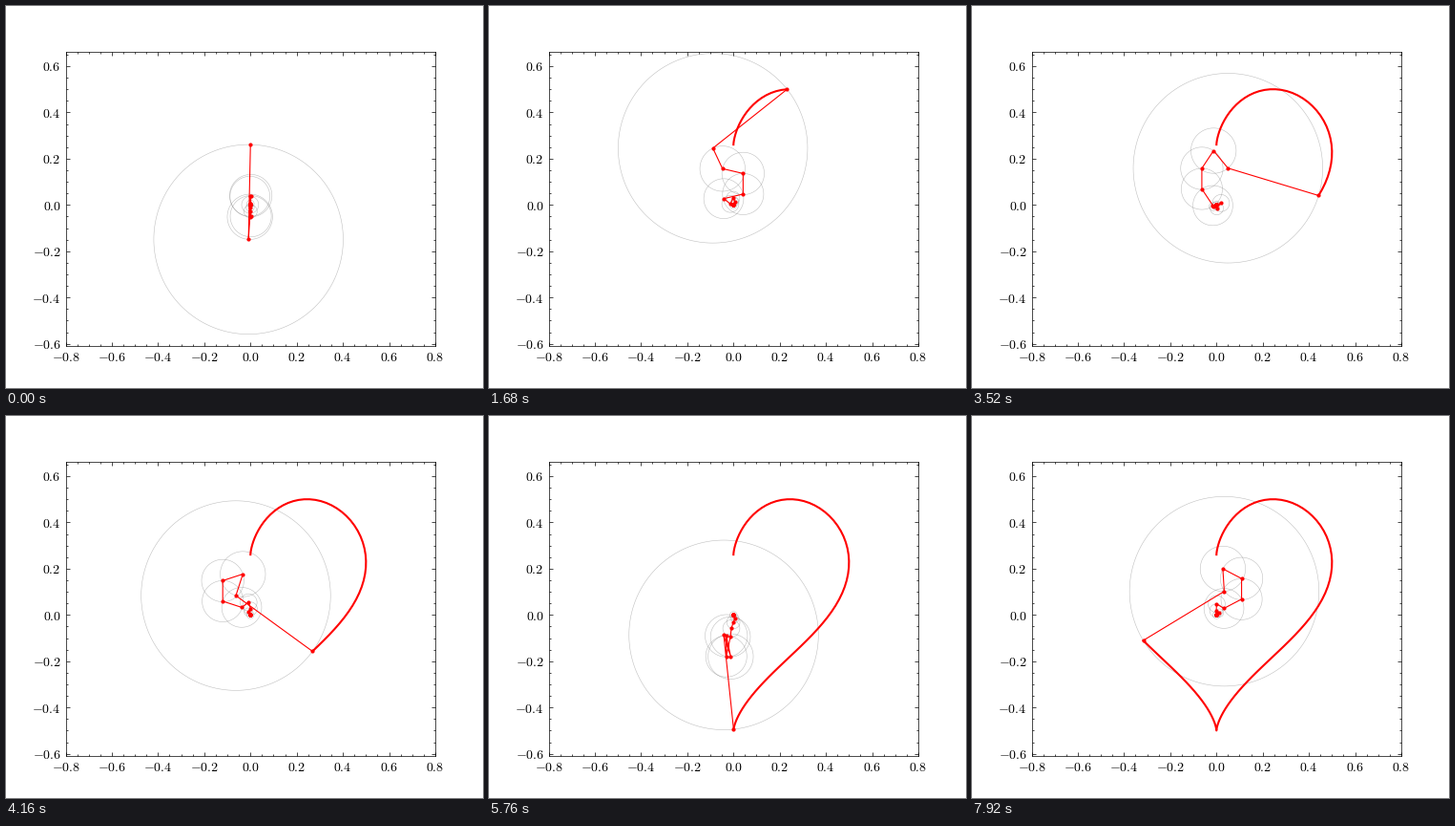
A matplotlib script for the animation above (8000 ms loop, 500 by 400 pixels).

```python
import numpy as np
import matplotlib.pyplot as plt
from matplotlib.animation import FuncAnimation
from matplotlib.collections import LineCollection
from matplotlib.ticker import AutoMinorLocator, FuncFormatter, MultipleLocator

SAMPLES = 150
FRAMES = 100
INTERVAL = 80

plt.rcParams.update({
    "mathtext.fontset": "cm",
    "font.size": 10,
    "axes.linewidth": 0.5,
})


def normalise(values):
    low, high = values.min(), values.max()
    return (values - low) / (high - low) - 0.5


def heart(t):
    x = 16 * np.sin(t) ** 3
    y = 13 * np.cos(t) - 5 * np.cos(2 * t) - 2 * np.cos(3 * t) - np.cos(4 * t)
    return normalise(x) + 1j * normalise(y)


# Fourier terms of the sampled outline, smallest first
coeffs = np.fft.fft(heart(np.linspace(0, 2 * np.pi, SAMPLES))) / SAMPLES
freqs = np.fft.fftfreq(SAMPLES, 1 / SAMPLES)
order = np.argsort(np.abs(coeffs))
coeffs, freqs = coeffs[order], freqs[order]

unit_circle = np.exp(1j * np.linspace(0, 2 * np.pi, 181))


def joints(n):
    arms = coeffs * np.exp(2j * np.pi * freqs * n / SAMPLES)
    return np.concatenate([[0], np.cumsum(arms)])


path = np.array([joints(n)[-1] for n in range(FRAMES)])

fig = plt.figure(figsize=(5, 4), dpi=100, facecolor="white")
ax = fig.add_axes([0.125, 0.11, 0.775, 0.77])
half_height = 0.8 * 308 / 387.5
ax.set_xlim(-0.8, 0.8)
ax.set_ylim(0.026 - half_height, 0.026 + half_height)

label = FuncFormatter(lambda v, _: f"${round(v, 1) + 0.0:.1f}$")
for axis in (ax.xaxis, ax.yaxis):
    axis.set_major_locator(MultipleLocator(0.2))
    axis.set_minor_locator(AutoMinorLocator(4))
    axis.set_major_formatter(label)
ax.tick_params(which="both", direction="in", top=True, right=True, width=0.5)
ax.tick_params(which="major", length=3)
ax.tick_params(which="minor", length=1.5)

circles = LineCollection([], colors="gray", linewidths=0.4, alpha=0.5, zorder=1)
ax.add_collection(circles, autolim=False)
trace, = ax.plot([], [], color="red", lw=1.5, zorder=2)
chain, = ax.plot([], [], color="red", lw=0.8, marker=".", ms=4, zorder=3)


def update(n):
    points = joints(n)
    rings = points[:-1, None] + np.abs(coeffs)[:, None] * unit_circle
    circles.set_segments(np.stack([rings.real, rings.imag], axis=-1))
    chain.set_data(points.real, points.imag)
    trace.set_data(path[:n + 1].real, path[:n + 1].imag)
    return circles, trace, chain


anim = FuncAnimation(fig, update, frames=FRAMES, interval=INTERVAL,
                     repeat=True, repeat_delay=0, blit=False)
plt.show()
```
